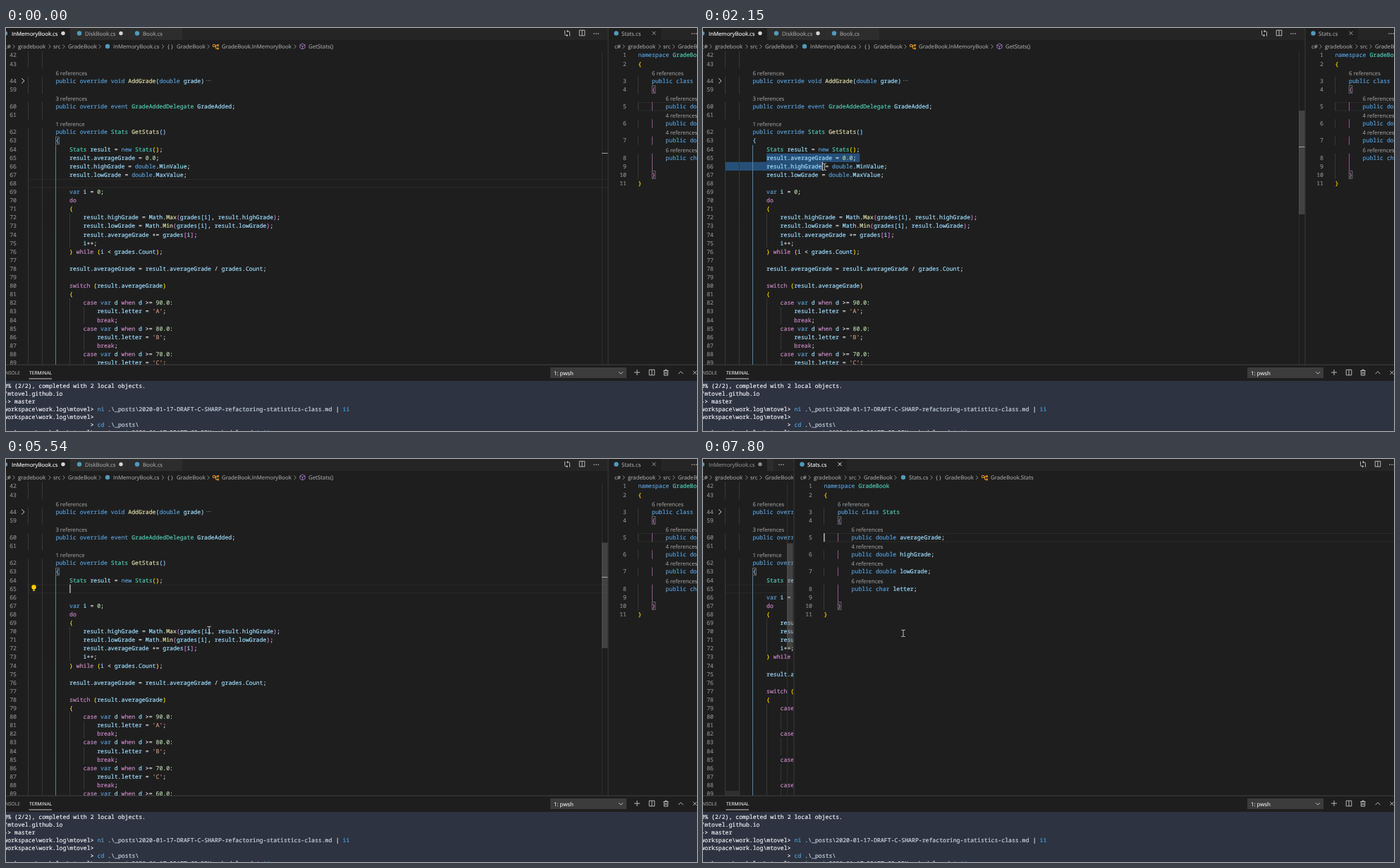
Write an HTML page that moves like this. It is 980x571 px and loops after 8000 ms.

```html
<!DOCTYPE html>
<html lang="en">
<head>
<meta charset="utf-8">
<title>Editor session</title>
<style>
html, body { margin: 0; width: 100%; height: 100%; overflow: hidden; background: #1e1e1e; }
svg { display: block; width: 100vw; height: 100vh; text-rendering: geometricPrecision; }
text { white-space: pre; }
text, tspan { fill: currentColor; stroke: currentColor; }
.m { font: 8.167px "Noto Sans Mono", "DejaVu Sans Mono", monospace; stroke-width: 0.2; }
.u { font: 7.8px "Open Sans", "Noto Sans", sans-serif; stroke-width: 0.12; }
.s { font: 6.7px "Open Sans", "Noto Sans", sans-serif; stroke-width: 0.12; }
</style>
</head>
<body>
<svg id="stage" viewBox="0 0 980 571" preserveAspectRatio="none"></svg>
<script>
const LOOP = 8000, CH = 4.9, ROW = 12.1;
const LEFT_X = 31.2, RIGHT_X = 896.4, TEXT_X = LEFT_X + 12 * CH;
const BLUE = '#519aba', GREY = '#a3a3a3', LIGHT = '#c8c8c8';
const stage = document.getElementById('stage');

// drawing helpers
const esc = s => s.replace(/&/g, '&amp;').replace(/</g, '&lt;').replace(/>/g, '&gt;');
const rect = (x, y, w, h, fill, more = '') =>
  `<rect x="${x}" y="${y}" width="${w}" height="${h}" fill="${fill}" ${more}/>`;
const text = (x, y, s, color, cls = 'u', more = '') =>
  `<text class="${cls}" x="${x}" y="${y}" color="${color}" ${more}>${esc(s)}</text>`;
const dot = (x, y, r, fill) => `<circle cx="${x}" cy="${y}" r="${r}" fill="${fill}"/>`;
const line = (x, y, d, color = LIGHT, w = 0.9) =>
  `<path transform="translate(${x} ${y})" d="${d}" fill="none" stroke="${color}" stroke-width="${w}"/>`;
const clip = (id, x, w, body) =>
  `<clipPath id="${id}"><rect x="${x}" y="0" width="${w}" height="477"/></clipPath><g clip-path="url(#${id})">${body}</g>`;
const rowY = k => 38.6 + ROW * k;
const rowTop = k => rowY(k) - ROW / 2;

// syntax colours
const KEYWORDS = new Set('public override void double event new var namespace class char'.split(' '));
const CONTROL = new Set('do while switch case when break'.split(' '));
const TYPES = new Set(['Stats', 'GradeAddedDelegate', 'GradeBook']);
const BRACKETS = ['#ffd700', '#da70d6', '#87cefa'];

function tokenColor(tok, next) {
  if (KEYWORDS.has(tok)) return '#569cd6';
  if (CONTROL.has(tok)) return '#c586c0';
  if (TYPES.has(tok)) return '#4ec9b0';
  if (/^\d/.test(tok)) return '#b5cea8';
  if (tok[0] === "'") return '#ce9178';
  if (/^\w/.test(tok)) return next === '(' ? '#dcdcaa' : '#9cdcfe';
  return '#d4d4d4';
}

const indentOf = s => s.search(/\S/);

// Renders numbered rows; a row without a number is a reference lens.
function renderCode(rows, x0, numX, depth, scope, scopeColor) {
  const real = k => rows[k] && rows[k][0] && rows[k][1] ? indentOf(rows[k][1]) : -1;
  const near = (k, step) => {
    for (k += step; rows[k]; k += step) if (real(k) >= 0) return real(k);
    return 0;
  };
  let out = '';
  rows.forEach(([num, src], k) => {
    const y = rowY(k);
    if (!num) {
      out += text(x0 + real(k + 1) * CH, y + 3.8, src, '#999');
      return;
    }
    out += text(numX, y + 2.8, String(num), '#858585', 'm', 'text-anchor="end"');
    const indent = src ? indentOf(src) : Math.max(near(k, -1), near(k, 1));
    for (let c = 0; c < indent; c += 4)
      out += rect(Math.round(x0 + c * CH), y - ROW / 2, 1, ROW + 0.1, c === scope ? scopeColor : '#383838');
    let spans = '';
    for (const m of src.matchAll(/'.'|[A-Za-z]\w*|\d+(?:\.\d+)?|[^\s]/g)) {
      let color = tokenColor(m[0], src[m.index + m[0].length]);
      if ('([{'.includes(m[0])) color = BRACKETS[depth++ % 3];
      else if (')]}'.includes(m[0])) color = BRACKETS[--depth % 3];
      spans += `<tspan x="${(x0 + m.index * CH).toFixed(2)}" color="${color}">${esc(m[0])}</tspan>`;
    }
    out += `<text class="m" y="${(y + 2.8).toFixed(2)}">${spans}</text>`;
  });
  return out;
}

// documents
const p2 = ' '.repeat(8), p3 = ' '.repeat(12), p4 = ' '.repeat(16), p5 = ' '.repeat(20);
const head = [
  [42, ''], [43, ''], [0, '6 references'],
  [44, p2 + 'public override void AddGrade(double grade)'], [59, ''], [0, '3 references'],
  [60, p2 + 'public override event GradeAddedDelegate GradeAdded;'], [61, ''], [0, '1 reference'],
];
const opening = [p2 + 'public override Stats GetStats()', p2 + '{', p3 + 'Stats result = new Stats();'];
const setup = [
  'result.averageGrade = 0.0;', 'result.highGrade = double.MinValue;', 'result.lowGrade = double.MaxValue;',
].map(s => p3 + s);
const rest = [
  '', p3 + 'var i = 0;', p3 + 'do', p3 + '{',
  p4 + 'result.highGrade = Math.Max(grades[i], result.highGrade);',
  p4 + 'result.lowGrade = Math.Min(grades[i], result.lowGrade);',
  p4 + 'result.averageGrade += grades[i];',
  p4 + 'i++;', p3 + '} while (i < grades.Count);', '',
  p3 + 'result.averageGrade = result.averageGrade / grades.Count;', '',
  p3 + 'switch (result.averageGrade)', p3 + '{',
];
[...'ABCD'].forEach((c, i) => rest.push(
  `${p4}case var d when d >= ${90 - 10 * i}.0:`, `${p5}result.letter = '${c}';`, p5 + 'break;'));

const makeDoc = middle => {
  const rows = head.concat([...opening, ...middle, ...rest].map((s, i) => [62 + i, s])).slice(0, 37);
  const art = renderCode(rows, LEFT_X, 15, 2, 8, '#5683a0')
    + text(283.5, rowY(3) + 2, '⋯', '#8a8a8a')
    + line(24, rowY(3), 'M-1.8-3.6L2 0L-1.8 3.6', '#d0d0d0', 1);
  return { rows, art };
};
const docs = [makeDoc(setup), makeDoc(['']), makeDoc([])];

const statsArt = renderCode([
  [1, 'namespace GradeBook'], [2, '{'], [0, '6 references'],
  [3, '    public class Stats'], [4, '    {'], [0, '6 references'],
  [5, p2 + 'public double averageGrade;'], [0, '4 references'],
  [6, p2 + 'public double highGrade;'], [0, '4 references'],
  [7, p2 + 'public double lowGrade;'], [0, '6 references'],
  [8, p2 + 'public char letter;'], [9, ''], [10, '    }'], [11, '}'],
], RIGHT_X, 880, 0, 4, '#94538f');

// window chrome
const chevron = x => line(x, 26.3, 'M-1.5-2.8L1.4 0L-1.5 2.8', GREY, 0.8);
const classIcon = x => line(x, 26, 'M-4-2.5h3v3h-3zM-1-1h4M0-1v4h3M2-2.5h2v2h-2zM2 2h2v2h-2z', '#ee9d28');
const cubeIcon = x => line(x, 26, 'M0-4L3.6-2V2L0 4L-3.6 2V-2ZM-3.6-2L0 0L3.6-2M0 0V4', '#b180d7', 0.8);
const more = (x, color = LIGHT) => [-3, 0, 3].map(d => dot(x + d, 8, 0.8, color)).join('');
const cross = (x, y, color) => line(x, y, 'M-2.5-2.5L2.5 2.5M2.5-2.5L-2.5 2.5', color, 0.9);
const split = (x, y) => line(x, y, 'M-3.8-3.8h7.6v7.6h-7.6zM0-3.8v7.6');
const actions = x => line(x, 7.5, 'M-3.5-4v5a2 2 0 0 0 2 2h2M-1 1.5L.7 3L-1 4.5M3.5 4v-5a2 2 0 0 0-2-2h-2M1-4.5L-.7-3L1-1.5')
  + split(x + 21, 7) + more(x + 41);
const crumbText = (x, items) => items.map(([dx, s]) => text(x + dx, 29.2, s, GREY)).join('');
const crumbPath = x => crumbText(x, [[-2, 'c#'], [17, 'gradebook'], [67, 'src'], [88, 'GradeBook']])
  + [11, 62, 82, 133].map(d => chevron(x + d)).join('') + dot(x + 144, 26, 3.2, BLUE);
const bar = (x, w) => rect(x, 0, w, 17, '#252526');

const leftChrome = narrow => {
  let s = bar(0, 854) + rect(0, 0, 90.5, 17, '#1e1e1e') + dot(-1, 7.5, 3.2, BLUE)
    + text(8, 10.6, 'InMemoryBook.cs', narrow ? '#8d8d8d' : '#fff') + dot(81, 7.5, 2.7, narrow ? '#8d8d8d' : '#d4d4d4');
  if (narrow) s += rect(91, 0, 9, 17, '#2d2d2d') + more(111);
  else s += rect(91, 0, 81.5, 17, '#2d2d2d') + rect(173, 0, 77, 17, '#2d2d2d')
    + dot(104, 7.5, 3.2, BLUE) + text(112, 10.6, 'DiskBook.cs', GREY) + dot(163, 7.5, 2.7, '#d4d4d4')
    + dot(186, 7.5, 3.2, BLUE) + text(194, 10.6, 'Book.cs', GREY, 'u', 'font-style="italic"') + actions(796);
  return s + crumbPath(0) + crumbText(0, [[152, 'InMemoryBook.cs'], [229, '{ }'], [242, 'GradeBook'],
    [306, 'GradeBook.InMemoryBook'], [429, 'GetStats()']])
    + [222.5, 287, 410].map(chevron).join('') + classIcon(297.5) + cubeIcon(420.5);
};

const bracketBox = (x, k) =>
  rect(x + 0.2, rowTop(k) + 0.8, CH - 0.2, ROW - 1.6, 'none', 'stroke="#888" stroke-width="0.7"');
const rowFrame = (x, k, w) => rect(x, rowTop(k) + 0.4, w, ROW - 0.6, 'none', 'stroke="#2a2a2a" stroke-width="1"');
const caretAt = (x, k) => rect(x - 0.3, rowTop(k), 1.2, ROW, '#d8d8d8');

const rightPane = focused => {
  const tint = focused ? '#fff' : GREY;
  const body = rect(854, 0, 860, 477, '#1e1e1e') + bar(854, 860) + rect(854, 0, 75, 17, '#1e1e1e')
    + dot(865.5, 7.5, 3.2, BLUE) + text(873, 10.6, 'Stats.cs', tint) + cross(919, 7.3, tint)
    + crumbPath(865) + crumbText(865, [[152, 'Stats.cs'], [190, '{ }'], [203, 'GradeBook'], [268, 'GradeBook.Stats']])
    + chevron(1049) + chevron(1113.5) + classIcon(1124.5)
    + rowFrame(897, 6, 840) + bracketBox(RIGHT_X + 4 * CH, 4) + bracketBox(RIGHT_X + 4 * CH, 14) + statsArt
    + (focused ? caretAt(RIGHT_X + 0.2, 6) : '') + rect(853.5, 0, 1, 477, '#3a3a3a');
  return `<g transform="translate(${focused ? -725 : 0} 0)">${body}</g>` + (focused ? actions(936) : more(976));
};

function makePanel() {
  const prompt = 'workspace\\work.log\\mtovel';
  const WHITE = '#eef0f4', CMD = '#4f9fdc', ARG = '#c9d3e3';
  const put = (col, k, s, color) => text((-2.7 + col * CH).toFixed(2), 509.7 + 11.05 * k, s, color, 'm');
  return rect(0, 477, 980, 23, '#1e1e1e') + rect(0, 476.7, 980, 0.9, '#434343')
    + text(20, 491, 'CONSOLE', '#999', 's', 'text-anchor="end"') + text(33, 491, 'TERMINAL', '#eee', 's')
    + rect(32.5, 496.5, 32.5, 0.9, '#ddd')
    + rect(772, 481, 108, 15, '#3c3c3c') + text(777, 491.6, '1: pwsh', '#f0f0f0')
    + line(872, 488.5, 'M-3-1.4L0 1.6L3-1.4') + line(895, 488, 'M-4 0h8M0-4v8') + split(916, 488)
    + line(936, 488.3, 'M-3.6-2.8h7.2M-1.2-2.8v-1.3h2.4v1.3M-2.7-2.8v6.6h5.4v-6.6M-.9-1v3.2M.9-1v3.2')
    + line(957, 488.5, 'M-3.4 1.6L0-1.8L3.4 1.6') + cross(977, 488.3, LIGHT)
    + rect(0, 500, 980, 71, '#2d3340')
    + put(0, 0, '0% (2/2), completed with 2 local objects.', WHITE)
    + put(0, 1, '/mtovel.github.io', WHITE) + put(0, 2, '-> master', WHITE)
    + put(0, 3, prompt + '>', WHITE) + put(27, 3, 'ni', CMD)
    + put(30, 3, '.\\_posts\\2020-01-17-DRAFT-C-SHARP-refactoring-statistics-class.md', ARG)
    + put(96, 3, '|', WHITE) + put(98, 3, 'ii', CMD)
    + put(0, 4, prompt + '>', WHITE)
    + put(25, 5, '>', WHITE) + put(27, 5, 'cd', CMD) + put(30, 5, '.\\_posts\\', ARG)
    + put(0, 6, prompt + '\\_posts>', WHITE) + put(34, 6, 'ni', CMD)
    + put(37, 6, '2020-01-17-DRAFT-CS-DRY-schedule.md', ARG) + put(73, 6, '| ii', CMD);
}

const panel = makePanel();
const chrome = [leftChrome(false), leftChrome(true)];
const right = [rightPane(false), rightPane(true)];

// motion: time, x, y of the pointer
const PATH = [
  [140, 700, 409], [840, 92, 184], [1220, 92, 184], [1450, 128, 184], [1900, 128, 184],
  [2450, 225, 212], [2760, 245, 213], [3220, 258, 213], [3560, 258, 213], [4220, 288, 240],
  [4680, 288, 242], [5540, 288, 242], [5770, 308, 247], [5980, 308, 247], [6150, 284, 246], [8000, 284, 247],
];
const CARET_ON = [[340, 840], [1220, 3600], [4100, 4600], [5080, 6020], [6470, 7330]];

function pointer(t) {
  const i = PATH.findIndex(p => p[0] > t);
  if (i < 1) return null;
  const [t0, x0, y0] = PATH[i - 1], [t1, x1, y1] = PATH[i];
  let p = (t - t0) / (t1 - t0);
  if (i === 1) p = 1 - (1 - p) ** 2;
  return [x0 + (x1 - x0) * p, y0 + (y1 - y0) * p];
}

// Selection starts at line 65 and follows the pointer while dragging.
function selection(t) {
  if (t < 1220 || t >= 5540) return null;
  const [x, y] = pointer(Math.min(t, 3300));
  const n = y < rowTop(13) ? 0 : y < rowTop(14) ? 1 : 2;
  const len = setup[n].length - 12;
  return { n, col: Math.max(0, Math.min(len, Math.floor((x - TEXT_X) / CH))) };
}

function selectionArt(sel, rows) {
  const end = TEXT_X + sel.col * CH;
  let out = '';
  if (!sel.n && sel.col) {
    const word = setup[0].substr(12, sel.col);
    rows.forEach(([num, src], k) => {
      for (let c = src.indexOf(word); num && c >= 0; c = src.indexOf(word, c + 1))
        out += rect(LEFT_X + c * CH, rowTop(k), word.length * CH, ROW, '#333940');
    });
  }
  for (let i = 0; i <= sel.n; i++) {
    const from = i ? 32 : TEXT_X;
    const to = i < sel.n ? LEFT_X + (setup[i].length + 1) * CH : end;
    out += rect(from, rowTop(12 + i), Math.max(0, to - from), ROW + 0.1, '#264f78');
  }
  return out;
}

function scene(t) {
  const narrow = t >= 7710 ? 1 : 0;
  const step = t < 5540 ? 0 : t < 6780 ? 1 : 2;
  const doc = docs[step], sel = selection(t), width = narrow ? 128 : 854;
  const selected = sel && (sel.n || sel.col);
  let s = rect(0, 0, 980, 477, '#1e1e1e') + chrome[narrow];
  if (!selected) s += rowFrame(32, t < 1220 ? 15 : 12, width);
  if (sel) s += selectionArt(sel, doc.rows);
  if (!sel || !sel.n) s += bracketBox(LEFT_X + 8 * CH, 10);
  s += doc.art;
  if (!narrow && CARET_ON.some(([a, b]) => t >= a && t < b)) {
    const k = t < 1220 ? 15 : 12 + (sel ? sel.n : 0);
    s += caretAt(step === 2 ? 32 : TEXT_X + (sel ? sel.col : 0) * CH + 0.6, k);
  }
  if (t >= 3390 && t < 7020)
    s += dot(39.5, 181.4, 3.2, '#ffcc00') + rect(38, 184, 3, 3, '#ffcc00') + rect(38, 185, 3, 0.6, '#1e1e1e');
  // overview ruler and scrollbars
  s += rect(width - 9, 33, 0.8, 444, '#333');
  if (t >= 140) {
    const [top, bottom] = [[117, 264], [118.5, 268], [119.5, 270]][step];
    s += rect(width - 9, top, 8.6, bottom - top, '#797979', 'opacity="0.4"');
  }
  if (narrow) s += rect(32, 470, 19, 7, '#2f2f2f');
  else {
    const y = step ? 166 + step : t < 1220 ? 177 : 164 + 4.5 * sel.n;
    s += rect(width - 9, Math.floor(y), 8.6, 1, '#a5a5a5');
  }
  let out = clip('pane', 0, width, s) + right[narrow] + panel;
  const at = pointer(t);
  if (at) out += line(at[0].toFixed(2), at[1].toFixed(2), 'M-2.6-4.6H-.8L0-4L.8-4.6H2.6M0-4V4M-2.6 4.6H-.8L0 4L.8 4.6H2.6', '#d6d6d6');
  return out;
}

let last = '';
function frame() {
  const art = scene(performance.now() % LOOP);
  if (art !== last) stage.innerHTML = last = art;
  requestAnimationFrame(frame);
}
frame();
</script>
</body>
</html>
```
